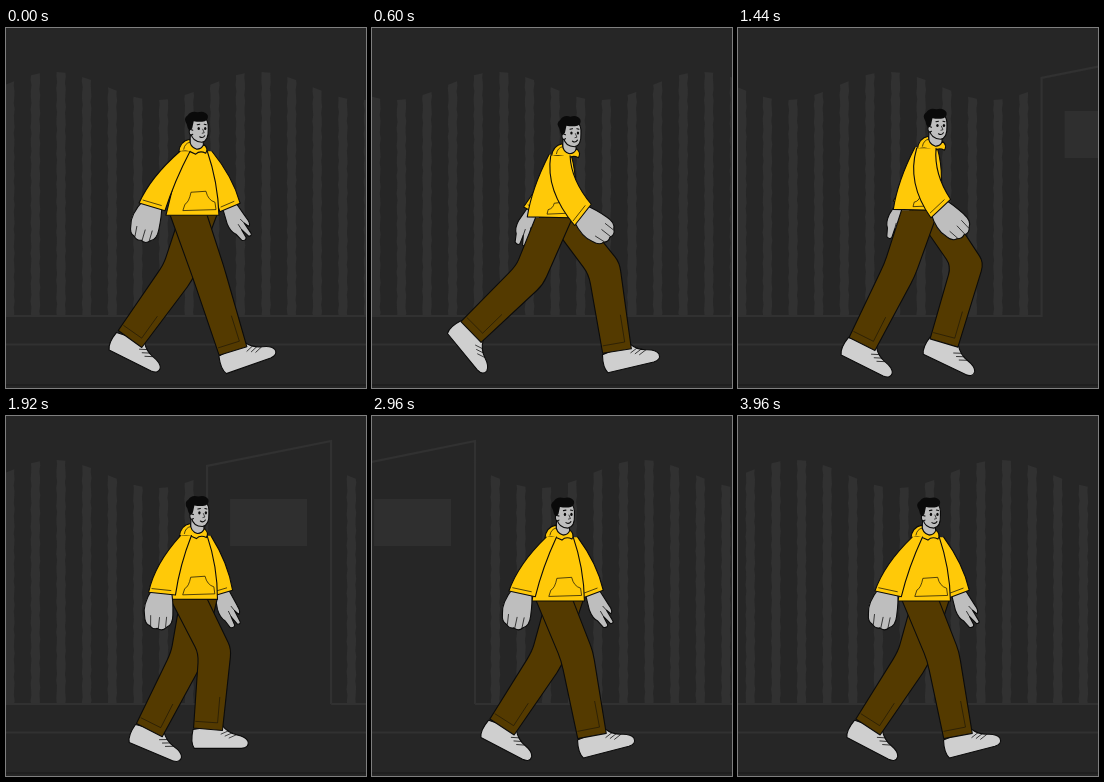
Recreate the animation shown at these times as an HTML page. Size 360 by 360 pixels, loop 4 s.

```html
<!DOCTYPE html>
<html lang="en">
<head>
<meta charset="utf-8">
<title>Walk</title>
<style>
html, body { margin: 0; width: 100%; height: 100%; overflow: hidden; background: #262626; }
svg { display: block; width: 100vw; height: 100vh; }
.ink { stroke: #0b0b0b; stroke-width: 1.1; stroke-linejoin: round; stroke-linecap: round; }
.line { fill: none; }
.thin { fill: none; stroke-width: .7; }
.seam { fill: none; stroke-width: .5; }
.cloth { fill: #ffc908; }
.pants { fill: #543a00; }
.skin { fill: #bebebe; }
.shoe { fill: #cfcfcf; }
.rail { fill: none; stroke: #313131; stroke-width: 2.2; }
</style>
</head>
<body>
<svg viewBox="0 0 360 360">
  <rect width="360" height="360" fill="#262626"/>
  <path d="M0 316.5H360" class="rail"/>
  <path d="M0 357H360" stroke="#1d1d1d" stroke-width="1.5"/>
  <g id="world"></g>
  <g id="man"></g>
</svg>
<script>
const LOOP = 4000, STEP = 40, CYCLE = 1000, TILE = 854, GAP = 25.62;
const NS = 'http://www.w3.org/2000/svg';
const world = document.getElementById('world'), man = document.getElementById('man');

function add(parent, tag, attrs = {}) {
  const el = document.createElementNS(NS, tag);
  for (const k in attrs) el.setAttribute(k, attrs[k]);
  return parent.appendChild(el);
}
const path = (parent, cls, d = '') => add(parent, 'path', { class: cls, d });
const mix = (a, b, k) => a + (b - a) * k;
const mixPt = (a, b, k) => [mix(a[0], b[0], k), mix(a[1], b[1], k)];
const pt = p => p[0].toFixed(2) + ' ' + p[1].toFixed(2);
const wave = (t, peak, period = CYCLE) => Math.cos(2 * Math.PI * (t - peak) / period);

// Fence and gate, one tile drawn twice
const fenceTop = x => 58 - 14 * wave(x, 48, GAP * 8);

function edge(x, seed) {
  const pts = [[x, fenceTop(x)]];
  for (let y = pts[0][1] + 4; y < 287; y += 6) pts.push([x + Math.sin(y * 1.7 + seed * 5) * .5, y]);
  pts.push([x, 287]);
  return pts.map(pt);
}
function tile(offset) {
  const g = add(world, 'g', { transform: `translate(${offset})` });
  let d = '';
  for (let k = -4; k <= 23; k++) {
    const x = 3.8 + GAP * k;
    d += `M${edge(x - 4.4, k).join('L')}L${edge(x + 4.4, k + .4).reverse().join('L')}Z`;
  }
  add(g, 'path', { d, fill: '#313131' });
  path(g, 'rail', 'M-119 288H611V50L735 25V288');
  add(g, 'path', { d: 'M634 83H711V130H634Z', fill: '#2f2f2f' });
}
tile(0);
tile(TILE);

// Leg keys: time, ankle x, ankle y, foot angle, knee bend
const nearKeys = [[0, 227, 323, -20, 1], [100, 234, 326, -6, 3], [260, 186, 328, 0, 4], [440, 124, 316, 26, 5],
  [600, 99, 304, 50, 14], [720, 116, 296, 52, 32], [850, 168, 302, 25, 36], [960, 220, 320, -15, 7]];
const farKeys = [[0, 124, 311, 26, 10], [100, 106, 304, 48, 16], [220, 122, 294, 50, 34], [340, 165, 300, 35, 38],
  [440, 206, 315, 25, 31], [520, 238, 317, -15, 12], [600, 245, 323, -14, 18], [760, 200, 327, 0, 8],
  [960, 130, 311, 27, 10]];

function sample(keys, t) {
  const n = keys.length;
  const key = i => {
    const [time, ...rest] = keys[(i + n) % n];
    return [time + Math.floor(i / n) * CYCLE, ...rest];
  };
  let i = n - 1;
  while (keys[i][0] > t) i--;
  const [a, b, c, d] = [key(i - 1), key(i), key(i + 1), key(i + 2)];
  const span = c[0] - b[0], u = (t - b[0]) / span, v = 1 - u;
  return [1, 2, 3, 4].map(j => {
    const m0 = (c[j] - a[j]) / (c[0] - a[0]) * span;
    const m1 = (d[j] - b[j]) / (d[0] - b[0]) * span;
    return (1 + 2 * u) * v * v * b[j] + u * v * v * m0 + u * u * (3 - 2 * u) * c[j] - u * u * v * m1;
  });
}

function makeLeg() {
  const shoe = add(man, 'g');
  path(shoe, 'ink shoe', 'M-15 0Q-18 13 -14 19L33 19.5Q41 19 40 13Q38 8 29 6Q20 4 14 -4Z');
  path(shoe, 'ink thin', 'M13 5L20 2M17 7L24 4M21 9L28 6');
  return { shoe, body: path(man, 'ink pants'), seam: path(man, 'ink seam') };
}

function drawLeg(leg, hip, [ax, ay, turn, bend]) {
  const dx = ax - hip[0], dy = ay - hip[1], dist = Math.hypot(dx, dy);
  const n = [dy / dist, -dx / dist];
  const side = (p, dir, w) => [p[0] + dir[0] * w, p[1] + dir[1] * w];
  const ankle = [ax, ay];
  const knee = side(mixPt(hip, ankle, .43), n, bend);
  const sx = ax - knee[0], sy = ay - knee[1], len = Math.hypot(sx, sy);
  const across = [sy / len, -sx / len];
  const hl = [hip[0] - 18.5, hip[1]], hr = [hip[0] + 18.5, hip[1]];
  const kl = side(knee, n, -16.5), kr = side(knee, n, 16.5);
  const al = side(ankle, across, -14.5), ar = side(ankle, across, 14.5);
  leg.body.setAttribute('d',
    `M${pt(hl)}L${pt(mixPt(hl, kl, .88))}Q${pt(kl)} ${pt(mixPt(kl, al, .12))}L${pt(al)}L${pt(ar)}` +
    `L${pt(mixPt(kr, ar, .1))}Q${pt(kr)} ${pt(mixPt(hr, kr, .88))}L${pt(hr)}`);
  const up = w => mixPt(side(ankle, across, w), side(knee, n, w), .09);
  leg.seam.setAttribute('d', `M${pt(up(-13))}L${pt(up(9))}L${pt(mixPt(up(9), side(knee, n, 9), .35))}`);
  leg.shoe.setAttribute('transform', `translate(${pt(ankle)}) rotate(${turn.toFixed(2)})`);
}

function makeArm(handShape, fingers) {
  const hand = add(man, 'g');
  path(hand, 'ink skin', handShape);
  path(hand, 'ink thin', fingers);
  return { hand, sleeve: path(man, 'ink cloth'), stitch: path(man, 'ink thin') };
}

// half: half widths at shoulder and cuff; bulge: sideways bow of both edges
function drawArm(arm, shoulder, cuff, turn, half, bulge) {
  const r = turn * Math.PI / 180, c = Math.cos(r), s = Math.sin(r);
  const at = (x, y) => [cuff[0] + x * c - y * s, cuff[1] + x * s + y * c];
  const sl = [shoulder[0] - half[0], shoulder[1]], sr = [shoulder[0] + half[0], shoulder[1]];
  const cl = at(-half[1], 0), cr = at(half[1], 0);
  const ctrl = (p, q, b) => { const m = mixPt(p, q, .5); return [m[0] + b, m[1]]; };
  arm.sleeve.setAttribute('d',
    `M${pt(sl)}Q${pt(ctrl(sl, cl, bulge[0]))} ${pt(cl)}L${pt(cr)}Q${pt(ctrl(sr, cr, bulge[1]))} ${pt(sr)}`);
  arm.stitch.setAttribute('d', `M${pt(at(3 - half[1], -4))}L${pt(at(half[1] - 5, -4))}`);
  arm.hand.setAttribute('transform', `translate(${pt(cuff)}) rotate(${turn.toFixed(2)})`);
}

// Parts, back to front
const farArm = makeArm(
  'M-7 -3L-9 14Q-9 23 -5 27L-2 35Q2 37 3 34L2 25L6 34Q10 35 9 31L7 20L10 25Q13 23 11 16L7 -3Z',
  'M2 25L1 19M7 20L5 15');
const farLeg = makeLeg(), nearLeg = makeLeg();
const torso = path(man, 'ink cloth');
const pocket = path(man, 'ink thin');
const head = add(man, 'g');
path(head, 'ink skin', 'M185 96L184 114Q190 120 198 115L197 106Z');
path(head, 'ink skin', 'M184 90Q186 85 199 86Q203 88 202.5 97Q203 109 196 110Q187 110 185 101Z');
add(head, 'path', {
  d: 'M181 92Q177 86 182 83Q185 78 192 80Q199 78 202 83Q203 87 199 89Q194 90 188 89L186.5 96L184 99Q181.5 96 181 92Z',
  fill: '#0a0a0a'
});
path(head, 'ink skin', 'M187 98Q183 96 183.500 100Q184 104 187 102');
path(head, 'ink line', 'M191.500 92.500L194 92M198.500 92L200.500 92.500M194 104.500Q197 106.500 199 103.500');
path(head, 'ink thin', 'M197 97L198.500 100.500L196.500 101');
for (const x of [193, 199.5]) add(head, 'ellipse', { cx: x, cy: 96.3, rx: 1.2, ry: 1.6, fill: '#0a0a0a' });
path(head, 'ink cloth', 'M173 120Q174 109 184 107Q184 115 191 117Q196 117 198 112Q203 116 200 121Q194 118 190 122Q182 117 173 120Z');
path(head, 'ink thin', 'M178 117Q179 111 184 110');
const nearArm = makeArm(
  'M-10 -4C-15 6 -18 15 -15 24Q-14 32 -9 33Q-5 37 -1 35Q4 38 8 33Q14 30 13 20Q12 6 9 -4Z',
  'M-8 33L-9 23M0 35L0 24M7 33L7 23');

function draw(t) {
  world.setAttribute('transform', `translate(${(-TILE * t / LOOP).toFixed(2)})`);
  const p = t % CYCLE;
  const bob = 4.5 - 4.5 * wave(p, 380, 500);
  const open = (1 + wave(p, 20)) / 2;
  const swing = wave(p, 60), farSwing = wave(p, 40);
  // Pose between side view and three-quarter view
  const pose = (sx, sy, ox, oy) => [mix(sx, ox, open), mix(sy, oy, open) + bob];

  drawLeg(farLeg, [193, 181 + bob], sample(farKeys, p));
  drawLeg(nearLeg, [182, 181 + bob], sample(nearKeys, p));

  const neckL = pose(177, 118, 176, 118), neckR = pose(199, 118, 201, 118);
  const hemL = pose(155, 180, 160, 183), hemR = pose(197, 181, 213, 183);
  torso.setAttribute('d',
    `M${pt(neckL)}Q${pt(pose(159, 152, 168, 150))} ${pt(hemL)}L${pt(hemR)}` +
    `Q${pt(pose(208, 150, 212, 150))} ${pt(neckR)}`);
  pocket.setAttribute('d',
    `M${pt(pose(175, 177, 177, 178))}L${pt(pose(176, 173, 179, 172))}` +
    `Q${pt(pose(181, 172, 183, 170))} ${pt(pose(182, 167, 185, 160))}L${pt(pose(190, 166, 200, 159))}` +
    `Q${pt(pose(192, 171, 202, 168))} ${pt(pose(197, 173, 209, 170))}L${pt(pose(197, 176, 210, 177))}Z`);
  head.setAttribute('transform', `translate(${(3.3 - 3.6 * wave(p, 20)).toFixed(2)} ${bob.toFixed(2)})`);

  drawArm(farArm, pose(190, 122, 200, 119), [192 + 33 * farSwing, 175 + bob + 4 * (1 - farSwing ** 2)],
    3 - 27 * farSwing, [6, 11], [0, 7 * open]);
  drawArm(nearArm, pose(189, 119, 179, 119), [177.8 - 34.2 * swing, 176 - 2 * swing + bob + 4 * (1 - swing ** 2)],
    -17 + 36 * swing, [mix(10, 5, open), 13.5], [mix(-18, -9, open), mix(-10, -3, open)]);
}

const start = performance.now();
function frame() {
  const t = (performance.now() - start) % LOOP;
  draw(Math.floor(t / STEP) * STEP);
  requestAnimationFrame(frame);
}
frame();
</script>
</body>
</html>
```
